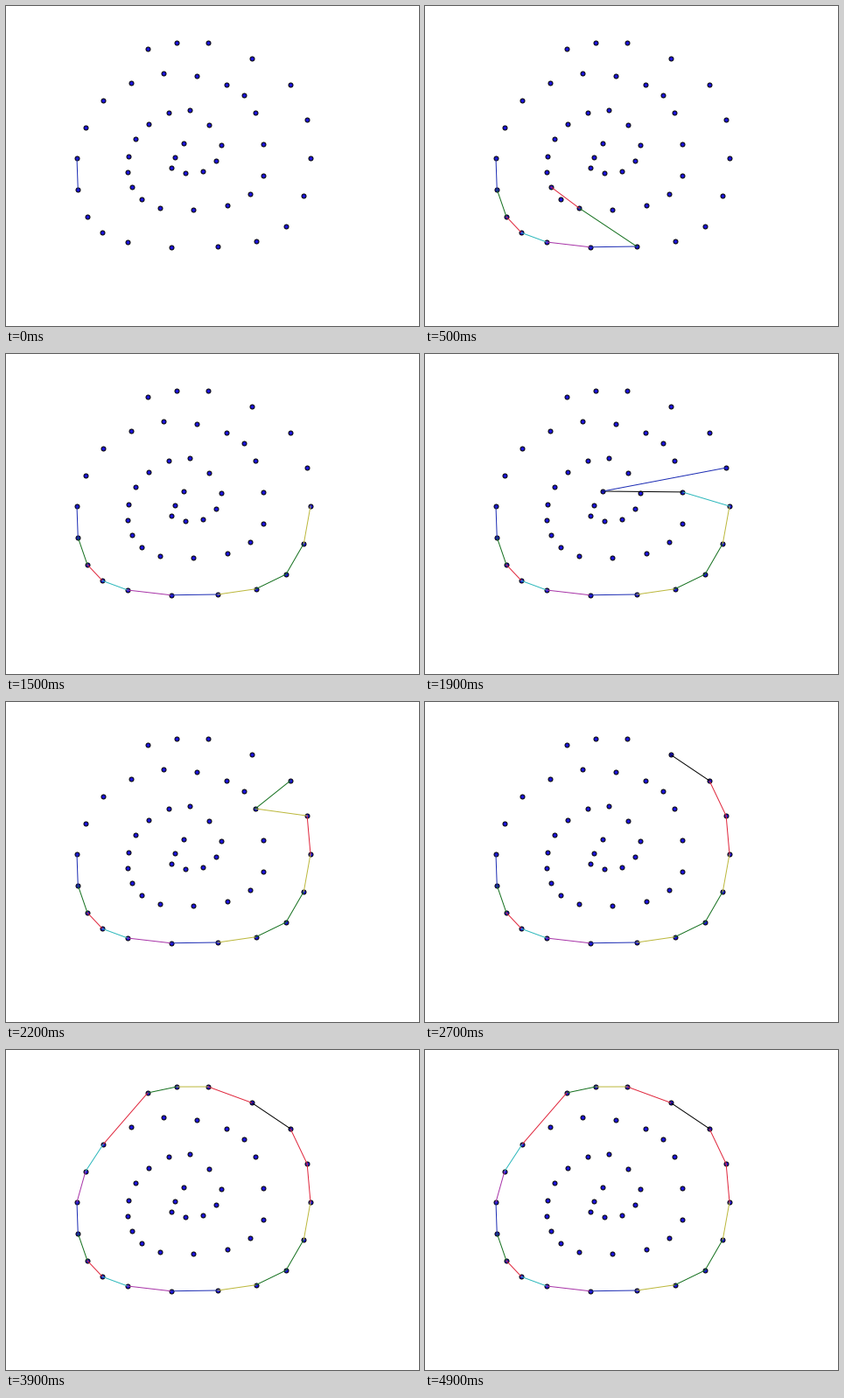
Recreate the animation shown at these times as a matplotlib script. Size 472x366 px, loop 6800 ms.

```python
import math

import matplotlib.pyplot as plt
import numpy as np
from matplotlib.animation import FuncAnimation

W, H, DPI = 472, 366, 64
PX = 72 / DPI  # points per pixel
FRAMES, INTERVAL = 68, 100
COLORS = ["#1c2cb4", "#14701e", "#e0263c", "#2cb8bc", "#a834a8", "#bcb83c", "k"]

# Key points along the spiral, from the inside out.
KEYS = [
    (203, 157), (189, 185), (225, 189), (246, 159), (210, 119), (163, 135),
    (140, 172), (144, 207), (176, 231), (253, 228), (294, 194), (285, 122),
    (252, 90), (180, 77), (111, 108), (81, 174), (93, 241), (139, 270),
    (242, 275), (320, 252), (348, 174), (325, 90), (231, 42), (162, 49),
]


def spiral(keys):
    """The key points plus a smooth cubic midpoint between each pair."""
    keys = np.array(keys, float)
    slope = np.gradient(keys, axis=0)
    mids = (keys[:-1] + keys[1:]) / 2 + (slope[:-1] - slope[1:]) / 8
    return [tuple(p) for p in np.vstack([keys, mids])]


def cross(a, b, c):
    return (b[0] - a[0]) * (c[1] - b[1]) - (b[1] - a[1]) * (c[0] - b[0])


def graham_steps(points):
    """Every state of the scan, as a list of (start, end, color) edges."""
    pivot = min(points)
    rest = [p for p in points if p != pivot]
    rest.sort(key=lambda p: -math.atan2(p[1] - pivot[1], p[0] - pivot[0]))

    hull, edges, steps = [pivot], [], []

    def push(p):
        edges.append((hull[-1], p, COLORS[len(steps) % len(COLORS)]))
        hull.append(p)
        steps.append(list(edges))

    for p in rest + [pivot]:
        push(p)
        while len(hull) > 2 and cross(*hull[-3:]) > 0:
            del hull[-2:], edges[-2:]
            push(p)
    return steps


points = spiral(KEYS)
steps = graham_steps(points)

fig = plt.figure(figsize=(W / DPI, H / DPI), dpi=DPI, facecolor="white")
ax = fig.add_axes([0, 0, 1, 1])
ax.set_xlim(0, W)
ax.set_ylim(H, 0)
ax.axis("off")

ax.plot(*zip(*points), "o", ms=5 * PX, mfc="#1c14d8", mec="k", mew=PX)
lines = [ax.plot([], [], lw=PX)[0] for _ in range(max(map(len, steps)))]


def update(frame):
    # The scan starts after a short hold and runs at 24 steps per second.
    step = math.floor(2.4 * frame - 2.7)
    edges = steps[min(max(step, 0), len(steps) - 1)]
    for i, line in enumerate(lines):
        line.set_visible(i < len(edges))
        if i < len(edges):
            start, end, color = edges[i]
            line.set_data(*zip(start, end))
            line.set_color(color)
    return lines


anim = FuncAnimation(fig, update, frames=FRAMES, interval=INTERVAL,
                     repeat=True, repeat_delay=0)
plt.show()
```
